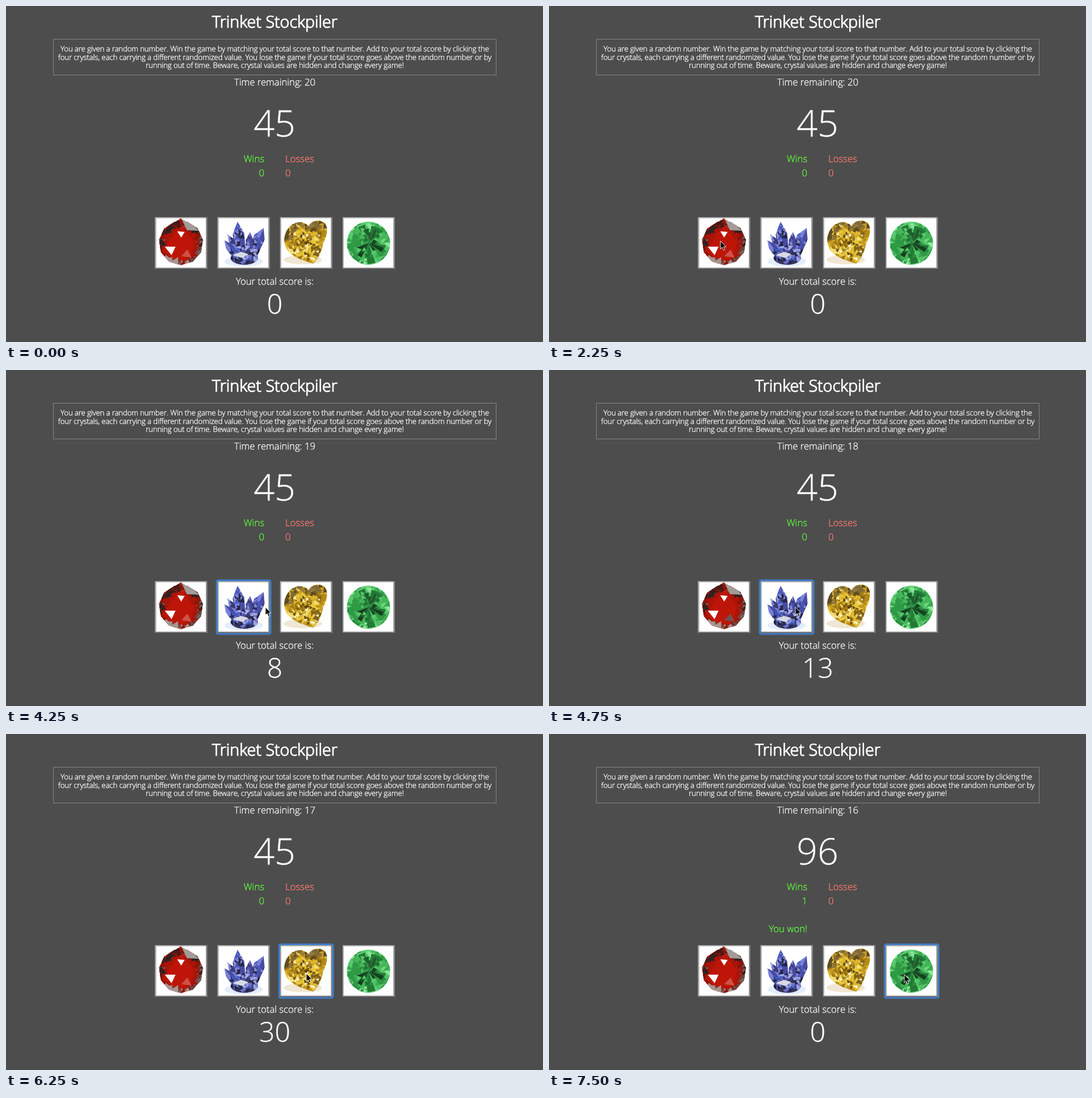
Write an HTML page that moves like this. It is 946 px wide and 592 px high and loops after 8000 ms.

```html
<!DOCTYPE html>
<html lang="en">
<head>
<meta charset="utf-8">
<title>Trinket Stockpiler</title>
<style>
  html, body { margin: 0; width: 100%; height: 100%; overflow: hidden; background: #4d4d4d; }
  svg { display: block; width: 100vw; height: 100vh; }
  text {
    font: 300 16.7px "Open Sans", sans-serif; text-anchor: middle; text-rendering: geometricPrecision;
    color: #fff; fill: currentColor; stroke: currentColor; stroke-width: .35px;
  }
  .title { font-size: 28.7px; stroke-width: 1.2px; }
  .rules { font-size: 13.3px; letter-spacing: -.17px; }
  .goal { font-size: 64.5px; }
  .score { font-size: 48px; }
  .win { color: #5fff3c; text-anchor: end; }
  .loss { color: #ff7a70; text-anchor: start; }
</style>
</head>
<body>
<svg viewBox="0 0 946 592">
  <rect width="946" height="592" fill="#4d4d4d"/>
  <text class="title" x="473.5" y="38">Trinket Stockpiler</text>
  <rect x="83.5" y="58.5" width="780" height="63" fill="none" stroke="#858585"/>
  <text class="rules" x="473.5" y="80">You are given a random number. Win the game by matching your total score to that number. Add to your total score by clicking the</text>
  <text class="rules" x="473.5" y="94.7">four crystals, each carrying a different randomized value. You lose the game if your total score goes above the random number or by</text>
  <text class="rules" x="473.5" y="109.4">running out of time. Beware, crystal values are hidden and change every game!</text>
  <text id="timer" x="473.5" y="140"></text>
  <text id="goal" class="goal" x="473" y="230"></text>
  <text class="win" x="455" y="275">Wins</text>
  <text class="loss" x="492" y="275">Losses</text>
  <text id="wins" class="win" x="455" y="300"></text>
  <text class="loss" x="492" y="300">0</text>
  <text id="won" class="win" x="455" y="349">You won!</text>
  <g id="gems"></g>
  <rect id="ring" x="261" y="370.5" width="95" height="94.5" rx="3" fill="none" stroke="#3d7cc6" stroke-width="3"/>
  <text x="473.5" y="491">Your total score is:</text>
  <text id="score" class="score" x="473.5" y="541.5"></text>
  <path id="cursor" d="M0 0V14L3.2 11L5.5 16.3L7.9 15.3L5.6 10.2H10Z" stroke="#fff" stroke-width=".9"/>
</svg>
<script>
const $ = id => document.getElementById(id);
const LOOP = 8000, STEP = 250, PITCH = 110.1, CENTER = 45.5;

let seed = 7;
const random = () => (seed = seed * 16807 % 2147483647) / 2147483647;
const between = (a, b) => a + random() * (b - a);
const pick = list => list[Math.floor(random() * list.length)];
const repeat = (n, draw) => Array.from({ length: n }, (_, i) => draw(i)).join('');
const poly = (points, fill, extra = '') => `<polygon points="${points}" fill="${fill}" ${extra}/>`;
const polar = (r, a, x = CENTER, y = CENTER) => [x + r * Math.cos(a), y + r * Math.sin(a)];
const clipped = (id, shape, body) =>
  `<clipPath id="${id}">${shape}</clipPath>${shape}<g clip-path="url(#${id})">${body}</g>`;

// Random triangles at a distance of near..far from the gem's centre.
const shards = (count, near, far, size, colors, from = 0, to = Math.PI * 2) => repeat(count, () => {
  const [x, y] = polar(between(near, far), between(from, to));
  const turn = random() * 7;
  return poly([0, 1, 2].map(k => polar(between(.3, .8) * size, turn + k * 2.1, x, y)), pick(colors));
});

function redGem() {
  const rim = Array.from({ length: 11 }, (_, i) => polar(39, i * Math.PI * 2 / 11 + Math.PI / 2));
  const shape = poly(rim, '#ab1408') + poly('45,2 20,20 71,20', '#a8281b');
  return clipped('red', shape,
    poly('45,14 68,44 62,76 30,76 14,58', '#bd1608') +
    shards(55, 31, 39, 11, ['#2a2422', '#6b5d59', '#8e1408', '#451a16'], -3.4, .4) +
    shards(25, 34, 41, 13, ['#a89590', '#8a1a10', '#6d4b46'], .4, 2.7) +
    poly('46,2 64,12 78,24 56,23', '#a39b98')) +
    poly('39,25 52,26 46,36', '#fff') +
    poly('17,52 36,52 29,67', '#fff') +
    poly('57,57 64,71 46,69', '#d0504a', 'id="facet"');
}

// A crystal column: a pointed tip, shoulders a third of the way down, then a flat foot.
function spike([x, y, tipX, tipY, width]) {
  const dx = x - tipX, dy = y - tipY, k = width / 2 / Math.hypot(dx, dy);
  const side = (t, s) => [tipX + dx * t - dy * k * s, tipY + dy * t + dx * k * s];
  const face = (s, fill) => poly([[tipX, tipY], side(.35, s), side(1, s), [x, y]], fill);
  return face(1, '#7880dc') + face(-1, '#484ca0');
}

function blueGem() {
  const spikes = [[36, 60, 17, 30, 9], [34, 70, 12, 41, 13], [60, 66, 81, 19, 20], [40, 68, 35, 8, 20], [55, 66, 57, 26, 13]];
  const shape = spikes.map(spike).join('') + '<ellipse cx="47" cy="72" rx="24" ry="12" fill="#34365f"/>';
  return '<ellipse cx="46" cy="78" rx="34" ry="9" fill="#e3edff"/>' +
    clipped('blue', shape,
      shards(70, 8, 38, 9, ['#24264a', '#8b90e2', '#a9aeee', '#4b5bc0', '#3a3c70']) +
      shards(50, 20, 36, 10, ['#1f2138', '#6d71c9', '#4055b8', '#272a4c', '#9aa3e0'], .5, 2.6)) +
    poly('26,67 41,61 54,65 44,72', '#d7d9e6');
}

function heartGem() {
  const shape = '<path d="M50 17C54 6 70 3 78 10C86 18 82 34 76 46C73 60 66 76 58 82C46 78 20 71 11 55C4 40 8 24 20 14C32 6 46 9 50 17Z" fill="#c49a22"/>';
  return '<ellipse cx="40" cy="75" rx="34" ry="8" fill="#f0e6d4"/>' +
    clipped('heart', shape,
      shards(190, 0, 42, 12, ['#e8c83c', '#d2a820', '#b38818', '#f3de78', '#80611a', '#ddb62c', '#a37a14']) +
      shards(30, 27, 46, 12, ['#7f6a38', '#94793a', '#5e4c22'], -2.9, -.6) +
      shards(40, 0, 34, 6, ['#fff3b8', '#5e430a', '#fff', '#6e4f0c']));
}

function greenGem() {
  const blades = (count, near, far, spread, colors) => repeat(count, () => {
    const angle = random() * Math.PI * 2, r = between(near, far);
    return poly([[CENTER, 46], polar(r, angle), polar(r, angle + spread)], pick(colors));
  });
  return clipped('green', '<circle cx="45.5" cy="46" r="38" fill="#4cbd60"/>',
    shards(80, 26, 38, 13, ['#6fd882', '#3aa94f', '#8be89a', '#2c8a41', '#58c96d']) +
    blades(26, 24, 38, .4, ['#2f9a45', '#45b55a', '#237a36', '#5cc871']) +
    blades(14, 15, 30, .3, ['#173f20', '#1b5f2a', '#205a2d']) +
    shards(26, 4, 26, 9, ['#17401f', '#2c8f42', '#206d31', '#58c96d']));
}

$('gems').innerHTML = [redGem, blueGem, heartGem, greenGem].map((draw, i) =>
  `<g transform="translate(${262.7 + i * PITCH} 372)">
    <rect width="91.5" height="91" fill="#fff"/>${draw()}
    <path d="M1 91V1H91" fill="none" stroke="#aaa" stroke-width="2"/>
    <path d="M0 90H90.5V0" fill="none" stroke="#858585" stroke-width="2"/>
  </g>`).join('');

const GOAL = 45, GEM_VALUES = [3, 5, 6, 9];
const focusTimes = [2500, 3500, 5500, 7250];
const clickTimes = [2500, 3500, 4750, 5000, 5500, 6250, 6750, 7500];
const cursorStops = [
  [250, 604, 95], [750, 501, 426], [1000, 501, 426], [1250, 374, 407], [1500, 311, 403],
  [2250, 302, 414], [3000, 302, 414], [3500, 392, 414], [4000, 394, 415], [4250, 457, 418],
  [4750, 434, 418], [5000, 436, 418], [5500, 529, 422], [6750, 529, 422], [7250, 626, 424]
];

const focusAt = t => focusTimes.filter(start => start <= t).length - 1;
const scoreAt = t => clickTimes.filter(click => click <= t)
  .reduce((sum, click) => sum + GEM_VALUES[focusAt(click)], 0);

function cursorAt(t) {
  const next = cursorStops.findIndex(([time]) => time > t);
  if (next < 0) return cursorStops.at(-1).slice(1);
  const [t0, x0, y0] = cursorStops[next - 1], [t1, x1, y1] = cursorStops[next];
  const p = ((t - t0) / (t1 - t0)) ** .6;
  return [x0 + (x1 - x0) * p, y0 + (y1 - y0) * p];
}
const show = (id, on) => $(id).setAttribute('visibility', on ? 'visible' : 'hidden');
const move = (id, x, y) => $(id).setAttribute('transform', `translate(${x} ${y})`);

function render(time) {
  const t = Math.floor(time / STEP) * STEP;   // the screen refreshes four times a second
  const focus = focusAt(t), score = scoreAt(t), won = score === GOAL;
  const elapsed = Math.min(t, clickTimes.at(-1) - STEP) - clickTimes[0];
  $('timer').textContent = 'Time remaining: ' + (20 - Math.max(0, Math.floor(elapsed / 1000)));
  $('score').textContent = won ? 0 : score;
  $('goal').textContent = won ? 96 : GOAL;
  $('wins').textContent = won ? 1 : 0;
  show('won', won);
  show('ring', focus >= 0);
  move('ring', focus * PITCH, 0);
  $('facet').setAttribute('fill', t >= 4500 && t < 5500 ? '#6b5350' : '#d0504a');
  const pointing = t >= cursorStops[0][0];
  show('cursor', pointing);
  if (pointing) move('cursor', ...cursorAt(t));
}

const begin = performance.now();
function tick() {
  render((performance.now() - begin) % LOOP);
  requestAnimationFrame(tick);
}
tick();
</script>
</body>
</html>
```
